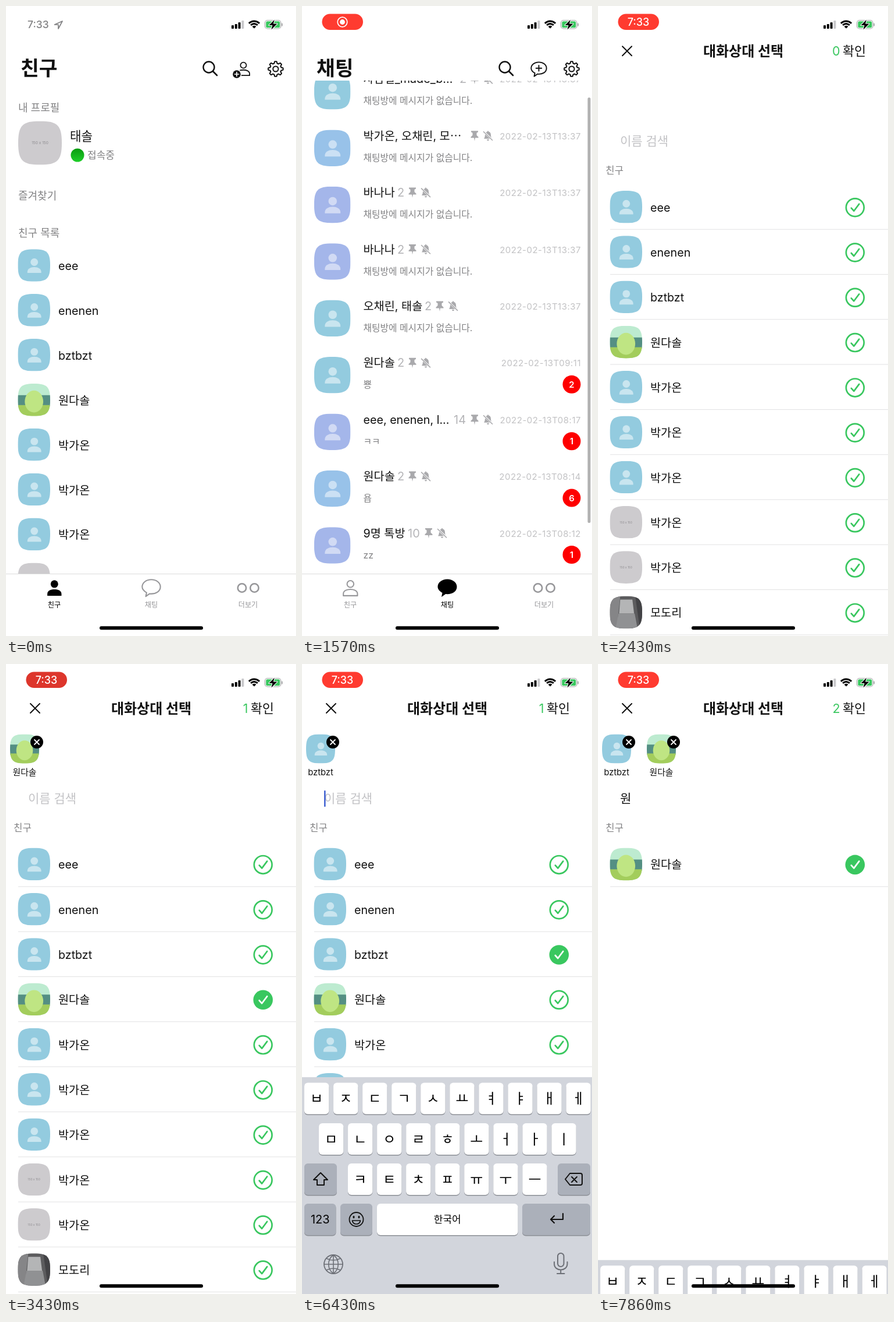
Recreate the animation shown at these times as an HTML page with a canvas. Size 499 by 1081 pixels, loop 8 s.

```html
<!DOCTYPE html>
<html lang="ko">
<head>
<meta charset="utf-8">
<style>
html, body { margin: 0; width: 100%; height: 100%; overflow: hidden; background: #fff; }
canvas { display: block; }
</style>
</head>
<body>
<canvas id="stage" width="499" height="1081"></canvas>
<script>
const LOOP = 8000, W = 499, H = 1081, TAU = Math.PI * 2;
const ctx = document.getElementById('stage').getContext('2d');
const GREEN = '#39c75f', GRAY = '#828284', BLUE = '#93cbdf', ICE = '#98c2e9', LILAC = '#a4b6ea';
const BUBBLE = 'M-10 16L-8.5 9C-14 6-16.5 2-16.5-1.5C-16.5-9-9-14.5 0-14.5S16.5-9 16.5-1.5C16.5 7 8 12-3 11Z';
const BODY = 'M-11.8 13V10C-11.8 4-5 2.5 0 2.5S11.8 4 11.8 10V13Z';

const friends = [
  ['eee', BLUE], ['enenen', BLUE], ['bztbzt', BLUE], ['원다솔', 'sprout'],
  ['박가온', BLUE], ['박가온', BLUE], ['박가온', BLUE], ['박가온', 'blank'],
  ['박가온', 'blank'], ['모도리', 'photo'], ['오채린', BLUE],
];
const EMPTY = '채팅방에 메시지가 없습니다.';
// name, avatar, member count, count x, time, message, unread
const chats = [
  ['차담결_made_b...', BLUE, 2, 271, '13:37', EMPTY],
  ['박가온, 오채린, 모⋯', ICE, '', 271, '13:37', EMPTY],
  ['바나나', LILAC, 2, 164, '13:37', EMPTY],
  ['바나나', LILAC, 2, 164, '13:37', EMPTY],
  ['오채린, 태솔', BLUE, 2, 211, '13:37', EMPTY],
  ['원다솔', BLUE, 2, 164, '09:11', '뿅', 2],
  ['eee, enenen, l...', LILAC, 14, 261, '08:17', 'ㅋㅋ', 1],
  ['원다솔', ICE, 2, 164, '08:14', '욥', 6],
  ['9명 톡방', LILAC, 10, 182, '08:12', 'zz', 1],
];

const clamp = v => Math.max(0, Math.min(1, v));
const ramp = (t, from, to) => clamp((t - from) / (to - from));
const easeOut = p => 1 - (1 - p) ** 2;

function at(x, y, draw, scale = 1) {
  ctx.save();
  ctx.translate(x, y);
  ctx.scale(scale, scale);
  draw();
  ctx.restore();
}
function clipped(y, h, draw) {
  ctx.save();
  ctx.beginPath();
  ctx.rect(0, y, W, h);
  ctx.clip();
  draw();
  ctx.restore();
}
function faded(alpha, draw) {
  if (alpha <= 0) return;
  ctx.save();
  ctx.globalAlpha = alpha;
  draw();
  ctx.restore();
}
function text(s, x, y, size, color = '#111', weight = 400, align = 'left', spacing = 0) {
  ctx.font = `${weight} ${size}px Inter, "Noto Sans CJK KR", "Noto Sans CJK", sans-serif`;
  ctx.letterSpacing = spacing + 'px';
  ctx.fillStyle = color;
  ctx.textAlign = align;
  ctx.fillText(s, x, y);
}
function fill(d, color) {
  ctx.fillStyle = color;
  ctx.fill(new Path2D(d));
}
function stroke(d, color, width) {
  ctx.strokeStyle = color;
  ctx.lineWidth = width;
  ctx.lineCap = ctx.lineJoin = 'round';
  ctx.stroke(new Path2D(d));
}
function rect(x, y, w, h, color, r = 0) {
  ctx.beginPath();
  ctx.roundRect(x, y, w, h, r);
  ctx.fillStyle = color;
  ctx.fill();
}
function ellipse(x, y, rx, ry, color) {
  ctx.beginPath();
  ctx.ellipse(x, y, rx, ry, 0, 0, TAU);
  ctx.fillStyle = color;
  ctx.fill();
}
const disc = (x, y, r, color) => ellipse(x, y, r, r, color);
function ring(x, y, r, color, width) {
  ctx.beginPath();
  ctx.arc(x, y, r, 0, TAU);
  ctx.strokeStyle = color;
  ctx.lineWidth = width;
  ctx.stroke();
}

function avatar(x, y, r, kind) {
  at(x, y, () => {
    ctx.clip(new Path2D('M-28 0C-28-22.5-22.5-28 0-28S28-22.5 28 0S22.5 28 0 28S-28 22.5-28 0Z'));
    if (kind === 'sprout') {
      rect(-28, -28, 56, 56, '#bdebd0');
      rect(-28, -8, 56, 20, '#548f83');
      rect(-28, 9, 56, 20, '#a3cd5c');
      ellipse(0, 3, 16, 19, '#bfe583');
    } else if (kind === 'photo') {
      rect(-28, -28, 56, 56, '#5c5c5e');
      fill('M-28-28H-10L-16 28H-28Z', '#858587');
      fill('M-10-22H11L14 2H-12Z', '#b4b5b6');
      fill('M-13 2H15L20 28H-18Z', '#909193');
      fill('M16-28H28V28H24Z', '#434346');
    } else if (kind === 'blank') {
      rect(-28, -28, 56, 56, '#cdcbce');
      text('150 x 150', 0, 1.8, 4.9, '#8f8d91', 400, 'center');
    } else {
      rect(-28, -28, 56, 56, kind);
      disc(0.5, -5.5, 6.5, '#ffffff80');
      fill('M-11.5 13V11.5C-11.5 6-6 3 .5 3S12.5 6 12.5 11.5V13Z', '#ffffff80');
    }
  }, r / 28);
}

function person(x, y, scale, color, solid) {
  at(x, y, () => {
    if (solid) {
      disc(0, -6.5, 6.3, color);
      fill(BODY, color);
    } else {
      ring(0, -6.5, 5.6, color, 2);
      stroke(BODY, color, 2);
    }
  }, scale);
}

function gear(x, y) {
  at(x, y, () => {
    ctx.beginPath();
    for (let i = 0; i <= 96; i++) {
      const a = i / 96 * TAU, r = 11.3 + 1.5 * Math.max(-1, Math.min(1, 2 * Math.cos(a * 8)));
      ctx.lineTo(r * Math.cos(a), r * Math.sin(a));
    }
    ctx.closePath();
    ctx.lineJoin = 'round';
    ctx.strokeStyle = '#111';
    ctx.lineWidth = 2;
    ctx.stroke();
    ring(0, 0, 4.6, '#111', 2);
  });
}

function header(title, chat) {
  text(title, 25, 118.5, 34.5, '#111', 700);
  ring(349, 105, 9.5, '#111', 2.4);
  stroke('M356 112L363 119', '#111', 2.6);
  if (chat) {
    at(407.5, 108, () => {
      stroke(BUBBLE, '#111', 2.4);
      stroke('M-6-1.5H6M0-7.5V4.5', '#111', 2.4);
    }, 0.8);
  } else {
    person(408.5, 107.5, 0.9, '#111', false);
    disc(397, 117, 8.4, '#fff');
    disc(397, 117, 6.8, '#111');
    stroke('M393.5 117H400.5M397 113.5V120.5', '#fff', 1.7);
  }
  gear(464, 108);
}

function tabBar(chat) {
  rect(0, 975, W, 106, '#fff');
  rect(0, 974, W, 1, '#dcdcdc');
  const tint = on => on ? '#000' : '#97979a';
  person(83.3, 998.5, 1.03, tint(!chat), !chat);
  at(250, 998, () => chat ? fill(BUBBLE, '#000') : stroke(BUBBLE, tint(false), 2.2), chat ? 1 : 0.95);
  ring(406, 998.5, 7.2, tint(false), 2.6);
  ring(427.5, 998.5, 7.2, tint(false), 2.6);
  text('친구', 83, 1032, 12.2, tint(!chat), 400, 'center');
  text('채팅', 250, 1032, 12.2, tint(chat), 400, 'center');
  text('더보기', 416.5, 1032, 12.2, tint(false), 400, 'center');
}

function friendsTab(t) {
  const scroll = 220 * Math.sin(Math.PI * ramp(t, 100, 1180)) ** 2;
  clipped(128, 847, () => at(0, -scroll, () => {
    text('내 프로필', 21, 180.5, 18, GRAY);
    avatar(58.5, 235, 37.5, 'blank');
    text('태솔', 110, 231, 21.2);
    const glow = ctx.createLinearGradient(0, 244, 0, 268);
    glow.addColorStop(0, '#0a9a10');
    glow.addColorStop(1, '#1fd02a');
    disc(123, 256, 11.5, glow);
    text('접속중', 140, 262, 17, GRAY);
    text('즐겨찾기', 21, 332, 18, GRAY);
    text('친구 목록', 21, 396, 18, GRAY);
    friends.forEach(([name, kind], i) => {
      const y = 445 + 76.9 * i;
      avatar(48.2, y, 27.8, kind);
      text(name, 90, y + 8, 19.7);
    });
  }));
  faded(ramp(t, 120, 200) * (1 - ramp(t, 1150, 1290)), () =>
    rect(492, 130 + scroll * 0.75, 4.5, 620, '#b2b2b2', 2.2));
  header('친구', false);
}

function pin(x, y) {
  at(x, y, () => fill('M-6-8.5H6V-6.5L3.5-5V-1L6.5 2V3.5H1L0 9L-1 3.5H-6.5V2L-3.5-1V-5L-6-6.5Z', '#a9a9ac'));
}
function mutedBell(x, y) {
  at(x, y, () => {
    fill('M-7 5C-4.5 2-5.5-2-4.5-4C-3.5-6.5-1.5-7-1-7.2C-1-9 1-9 1-7.2C4-6.5 5-4 5-1C5 2 6 3.5 7 5ZM-2 6.2H2C2 9-2 9-2 6.2Z', '#a9a9ac');
    stroke('M-7-6.5L7.5 7', '#fff', 3.2);
    stroke('M-7.5-7L7.5 7.5', '#a9a9ac', 1.6);
  });
}

function chatTab(t) {
  const scroll = 37 * Math.sin(Math.PI * ramp(t, 1290, 1850));
  clipped(128, 847, () => chats.forEach(([name, color, count, x, time, message, unread], i) => {
    const y = 183.3 - scroll + 97.4 * i;
    avatar(52.2, y, 31.3, color);
    text(name, 105.5, y - 14, 19.7);
    text(count, x, y - 14, 20, '#b4b4b7');
    const iconX = x + (count > 9 ? 36 : 26);
    pin(iconX, y - 21);
    mutedBell(iconX + 23, y - 21);
    text('2022-02-13T' + time, 480, y - 15, 15, '#c2c2c4', 400, 'right', 0.5);
    text(message, 105.5, y + 22, 15.8, GRAY);
    if (unread) {
      disc(464, y + 16, 15.5, '#fe0000');
      text(unread, 464, y + 21.5, 15, '#fff', 600, 'center');
    }
  }));
  faded(1 - ramp(t, 1850, 2100), () => rect(491.5, 120 + scroll, 5, 730, '#b2b2b2', 2.5));
  header('채팅', true);
}

function check(x, y, on) {
  if (on) disc(x, y, 16.8, GREEN);
  else ring(x, y, 15.4, GREEN, 2.7);
  at(x, y, () => stroke('M-6.5 1L-2 6L7-6', on ? '#fff' : GREEN, 2.7));
}

function typed(t) {
  return t < 6520 ? '' : t < 6660 ? 'ㅇ' : t < 6800 ? '우' : t < 7000 ? '워' : '원';
}
function chosen(t) {
  if (t < 3000) return [];
  if (t < 4140) return [3];
  if (t < 5140) return [3, 2];
  return t < 7430 ? [2] : [2, 3];
}

function picker(t) {
  const picks = chosen(t), query = typed(t);
  rect(0, 0, W, H, '#fff');
  stroke('M42 68L58 84M58 68L42 84', '#111', 2);
  text('대화상대 선택', 250, 84.5, 24, '#111', 700, 'center');
  text(picks.length, 416.5, 83.5, 21.5, GREEN, 400, 'right');
  text('확인', 421, 83.5, 21.8);

  picks.forEach((id, i) => {
    const x = 32 + 77 * i;
    avatar(x, 145.5, 25, friends[id][1]);
    disc(x + 21, 134, 11, '#000');
    at(x + 21, 134, () => stroke('M-4-4L4 4M4-4L-4 4', '#fff', 1.8));
    text(friends[id][0], x, 191, 14.8, '#111', 400, 'center');
  });

  text(query || '이름 검색', 38, 238, 21, query ? '#111' : '#c3c3c6');
  const blink = query ? t < 7710 : t > 5500 && (t - 5180) % 1000 < 500;
  if (blink) rect(38 + (query && ctx.measureText(query).width), 217, 2.6, 28, '#4464d2', 1);

  text('친구', 13, 287, 16.8, GRAY);
  friends.map((f, id) => [...f, id]).filter(f => f[0].startsWith(query)).forEach(([name, kind, id], i) => {
    const y = 343.4 + 77.3 * i;
    avatar(48.2, y, 27.8, kind);
    text(name, 90, y + 8, 19.7);
    check(442.3, y + 1, picks.includes(id));
    rect(21, y + 38, W - 21, 1, '#e2e2e3');
  });
}

function key(x, y, w, label, dark, size = 24) {
  rect(x, y + 1.5, w, 54, '#8c8f96', 6);
  rect(x, y, w, 54, dark ? '#abb0ba' : '#fff', 6);
  text(label, x + w / 2, y + 27 + size * 0.37, size, '#000', 400, 'center');
}

function keyboard() {
  rect(0, 709, W, 372, '#d2d5dc');
  [['ㅂㅈㄷㄱㅅㅛㅕㅑㅐㅔ', 4, 718.5], ['ㅁㄴㅇㄹㅎㅗㅓㅏㅣ', 29, 788], ['ㅋㅌㅊㅍㅠㅜㅡ', 79, 857]]
    .forEach(([row, x, y]) => [...row].forEach((c, i) => key(x + 50.05 * i, y, 42.3, c)));
  key(4, 857, 56, '', true);
  key(440, 857, 56, '', true);
  key(4, 926, 54.5, '123', true, 20);
  key(66, 926, 55, '', true);
  key(129, 926, 242.5, '한국어', false, 17);
  key(379, 926, 117, '', true);

  stroke('M32 873L44 885H38V894H26V885H20Z', '#111', 2);
  stroke('M461 874H479Q482 874 482 877V891Q482 894 479 894H461L453 884ZM464 880L473 889M473 880L464 889', '#111', 2);
  stroke('M449 943V953H428M434 947L428 953L434 959', '#111', 2.2);

  ring(93.5, 953, 12, '#111', 1.8);
  ellipse(89, 949, 1.5, 2.2, '#111');
  ellipse(98, 949, 1.5, 2.2, '#111');
  stroke('M86.5 955H100.5C99 963 88 963 86.5 955Z', '#111', 1.7);

  const dim = '#6d7077';
  ring(54, 1030, 16, dim, 1.8);
  stroke('M38 1030H70M54 1014V1046M54 1014C43 1022 43 1038 54 1046M54 1014C65 1022 65 1038 54 1046M42 1020C50 1024 58 1024 66 1020M42 1040C50 1036 58 1036 66 1040', dim, 1.6);
  ctx.beginPath();
  ctx.roundRect(440, 1011, 10.5, 23, 5.2);
  ctx.strokeStyle = dim;
  ctx.lineWidth = 2;
  ctx.stroke();
  stroke('M434 1026V1029C434 1043 456.5 1043 456.5 1029V1026M445.2 1039.5V1046M439 1046H451.5', dim, 2);
}

function statusBar(t) {
  faded(1 - ramp(t, 140, 300), () => {
    text('7:33', 37, 38, 17.5, GRAY, 500);
    stroke('M97 26L83.5 32H90V39Z', GRAY, 1.7);
  });
  faded(ramp(t, 260, 480), () => {
    const dark = Math.max(0, Math.cos((t - 3430) / 1333 * TAU));
    rect(34.5, 13.5, 70.5, 27.5, `rgb(${255 - 34 * dark}, ${59 - 5 * dark}, ${48 - 4 * dark})`, 13.7);
    const swap = ramp(t, 1850, 2100);
    faded(1 - swap, () => {
      ring(69.5, 27.5, 8.3, '#fff', 1.7);
      disc(69.5, 27.5, 4.4, '#fff');
    });
    faded(swap, () => text('7:33', 69.5, 33.8, 18, '#fff', 500, 'center'));
  });

  [6, 8, 11, 14].forEach((h, i) => rect(388 + 5.8 * i, 39 - h, 4, h, i < 3 ? '#000' : '#c9c9cb', 1));
  ctx.lineCap = 'butt';
  ctx.strokeStyle = '#000';
  [[12.5, 3], [8, 3], [2.4, 4.6]].forEach(([r, w]) => {
    ctx.beginPath();
    ctx.arc(427, 38.5, r, -2.38, -0.76);
    ctx.lineWidth = w;
    ctx.stroke();
  });
  ctx.beginPath();
  ctx.roundRect(445.5, 24.5, 27.5, 14.5, 4.5);
  ctx.strokeStyle = '#a6a6a8';
  ctx.lineWidth = 1.2;
  ctx.stroke();
  rect(474.3, 29.5, 1.7, 5, '#a6a6a8', 1);
  rect(447.3, 26.3, 24, 11, GREEN, 2.6);
  const bolt = 'M462 23.5L452.5 33H458.5L456.5 40.5L466.5 30.5H460Z';
  stroke(bolt, '#fff', 2);
  fill(bolt, '#000');
}

function draw() {
  const t = performance.now() % LOOP;
  rect(0, 0, W, H, '#fff');
  const onChat = t >= 1290;
  if (onChat) chatTab(t);
  else friendsTab(t);
  tabBar(onChat);

  // the sheet rises like a critically damped spring
  const u = 18 * (t - 1930) / 1000;
  if (u > 0) at(0, H * (1 + u) * Math.exp(-u), () => picker(t));

  const shown = easeOut(ramp(t, 5480, 5580)) - easeOut(ramp(t, 7710, 7960));
  if (shown > 0) at(0, 372 * (1 - shown), keyboard);

  statusBar(t);
  rect(161, 1064.2, 178, 6, '#000', 3);
  requestAnimationFrame(draw);
}
draw();
</script>
</body>
</html>
```
